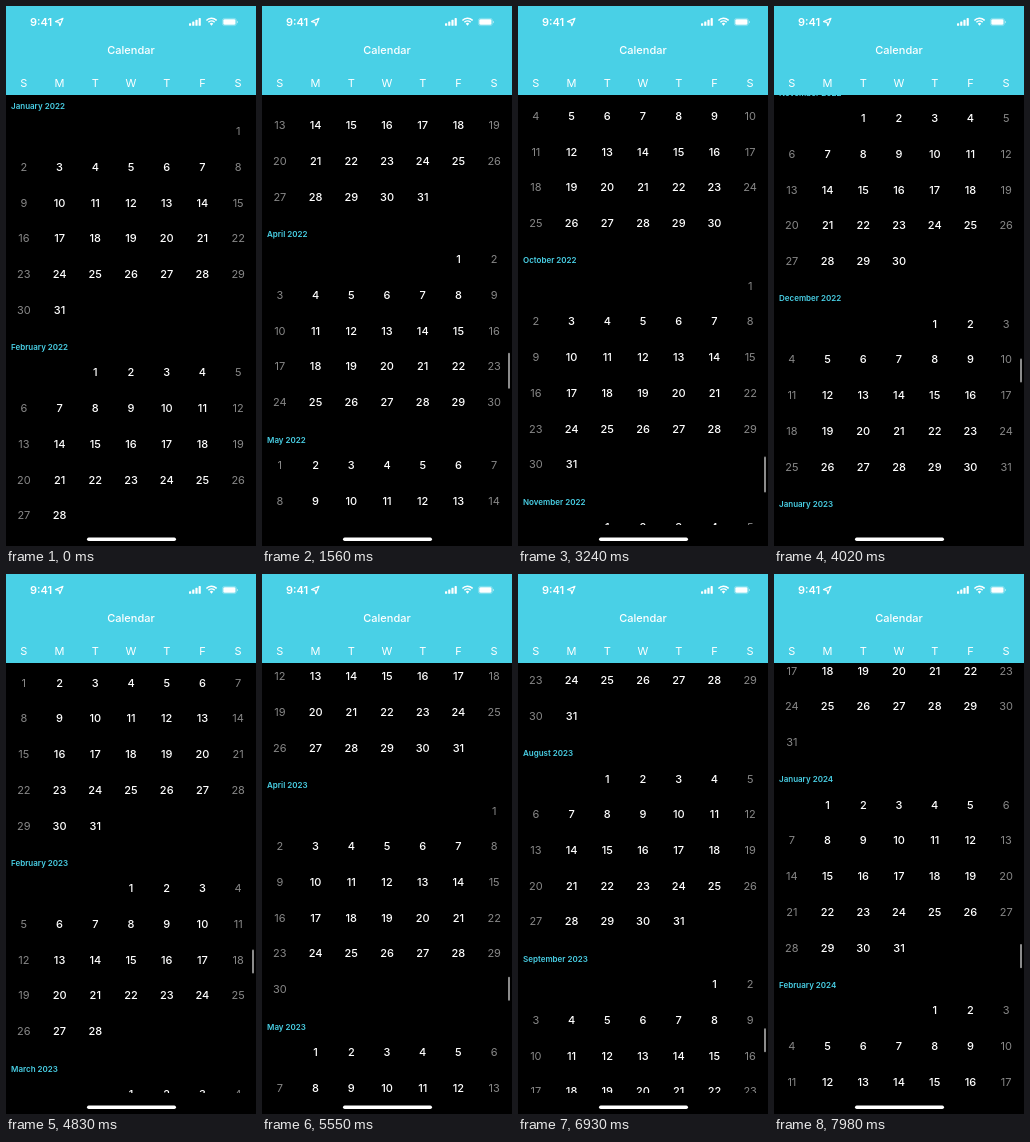
These frames come from a looping animation (250 by 540 pixels, 8000 ms). An HTML page with a canvas:

```html
<!DOCTYPE html>
<html lang="en">
<head>
<meta charset="utf-8">
<title>Calendar</title>
<style>
html, body { margin: 0; width: 100%; height: 100%; overflow: hidden; background: #000; }
canvas { display: block; width: 250px; height: 540px; }
</style>
</head>
<body>
<canvas id="stage"></canvas>
<script>
const W = 250, H = 540, LOOP = 8000, STEP = 30;
const TOP = 89, BOTTOM = 519, VIEW = BOTTOM - TOP;
const CELL = W / 7, TITLE_H = 27;
const CYAN = '#49d0e6', GRAY = '#878787';
const FONT = 'px Inter, Roboto, sans-serif';

const canvas = document.getElementById('stage');
const ctx = canvas.getContext('2d');
const dpr = window.devicePixelRatio || 1;
canvas.width = W * dpr;
canvas.height = H * dpr;
ctx.scale(dpr, dpr);

// Scroll offset over time: [ms, px]
const path = [[720, 0], [1560, 524.4], [3240, 1767], [4830, 2590.5],
              [5550, 3079.3], [6930, 4005], [7980, 5042.5]];
const slope = i => (path[i + 1][1] - path[i][1]) / (path[i + 1][0] - path[i][0]);
const tangents = path.map((p, i) => {
  if (i === 0) return 0.15;
  if (i === path.length - 1) return slope(i - 1);
  const a = slope(i - 1), b = slope(i);
  return 2 * a * b / (a + b);
});

function scrollAt(t) {
  if (t <= path[0][0]) return 0;
  let i = 0;
  while (i < path.length - 2 && t > path[i + 1][0]) i++;
  const [t0, y0] = path[i], [t1, y1] = path[i + 1];
  const d = t1 - t0, u = Math.min(1, (t - t0) / d), v = 1 - u;
  return y0 * v * v * (1 + 2 * u) + y1 * u * u * (3 - 2 * u)
    + d * u * v * (tangents[i] * v - tangents[i + 1] * u);
}

// Months of 2021 to 2024, with January 2022 at offset zero
const months = [];
const yearTop = {};
let offset = 0;
for (let m = 0; m < 48; m++) {
  const date = new Date(2021, m, 1);
  const start = date.getDay();
  const days = new Date(2021, m + 1, 0).getDate();
  const title = date.toLocaleString('en-US', { month: 'long' }) + ' ' + date.getFullYear();
  if (m % 12 === 0) yearTop[date.getFullYear()] = offset;
  const height = TITLE_H + Math.ceil((start + days) / 7) * CELL;
  months.push({ title, start, days, top: offset, height });
  offset += height;
}
yearTop[2025] = offset;
const origin = yearTop[2022];
months.forEach(m => m.top -= origin);
for (const y in yearTop) yearTop[y] -= origin;

function text(s, x, y, size, weight, color, align = 'center') {
  ctx.font = weight + ' ' + size + FONT;
  ctx.fillStyle = color;
  ctx.textAlign = align;
  ctx.fillText(s, x, y + size * 0.364);
}

function pill(x, y, w, h, r, color) {
  ctx.fillStyle = color;
  ctx.beginPath();
  ctx.roundRect(x, y, w, h, r);
  ctx.fill();
}

function drawMonth(m, y) {
  text(m.title, 5, y, 8, 600, CYAN, 'left');
  for (let d = 1; d <= m.days; d++) {
    const slot = m.start + d - 1, col = slot % 7, row = Math.floor(slot / 7);
    const weekend = col === 0 || col === 6;
    text(d, (col + 0.5) * CELL, y + 25.2 + row * CELL, 11,
      weekend ? 400 : 500, weekend ? GRAY : '#fff');
  }
}

function drawIndicator(t, scroll) {
  // Three years at most are loaded; the next one joins when the last month shows.
  const last = scroll > 4477 ? 2024 : scroll > 1940 ? 2023 : 2022;
  const first = Math.max(2021, last - 2);
  const total = yearTop[last + 1] - yearTop[first];
  const alpha = 0.55 * Math.max(0, Math.min(1, (t - 720) / 150));
  const y = TOP + (scroll - yearTop[first]) / total * VIEW;
  pill(246, y - 1, 2, VIEW * VIEW / total, 1, `rgba(255,255,255,${alpha})`);
}

function drawHeader() {
  ctx.fillStyle = CYAN;
  ctx.fillRect(0, 0, W, TOP);
  text('Calendar', 125, 44, 11, 500, '#fff');
  [...'SMTWTFS'].forEach((s, i) => text(s, (i + 0.5) * CELL, 77, 11, 400, '#fff'));
  text('9:41', 24, 16, 11, 600, '#fff', 'left');

  ctx.strokeStyle = '#fff';
  ctx.lineWidth = 1.1;
  ctx.lineJoin = 'round';
  ctx.stroke(new Path2D('M57 12.3L49.5 15.6L53 16.4L53.8 19.8Z'));

  for (let i = 0; i < 4; i++) {
    const h = 2.6 + i * 1.7;
    pill(183 + i * 3.2, 19.8 - h, 2.2, h, 0.6, '#fff');
  }

  ctx.lineWidth = 1.5;
  for (const r of [4.3, 7]) {
    ctx.beginPath();
    ctx.arc(205.5, 19.2, r, -Math.PI * 0.76, -Math.PI * 0.24);
    ctx.stroke();
  }
  ctx.fillStyle = '#fff';
  ctx.beginPath();
  ctx.moveTo(205.5, 19.8);
  ctx.arc(205.5, 19.2, 2.3, -Math.PI * 0.76, -Math.PI * 0.24);
  ctx.fill();

  ctx.lineWidth = 0.6;
  ctx.strokeStyle = 'rgba(255,255,255,.5)';
  ctx.beginPath();
  ctx.roundRect(216.4, 12.4, 14, 7.2, 2.2);
  ctx.stroke();
  pill(217.3, 13.2, 12.2, 5.6, 1.4, '#fff');
  pill(231, 14.8, 0.8, 2.4, 0.4, 'rgba(255,255,255,.6)');
}

function draw(t) {
  const scroll = scrollAt(t);
  ctx.fillStyle = '#000';
  ctx.fillRect(0, 0, W, H);

  ctx.save();
  ctx.beginPath();
  ctx.rect(0, TOP, W, VIEW);
  ctx.clip();
  for (const m of months) {
    const y = 100 + m.top - scroll;
    if (y < BOTTOM + 10 && y + m.height > TOP - 10) drawMonth(m, y);
  }
  drawIndicator(t, scroll);
  ctx.restore();

  drawHeader();
  pill(81, 531.5, 89, 3.4, 1.7, '#fff');
}

const begin = performance.now();
function tick() {
  const t = (performance.now() - begin) % LOOP;
  draw(Math.floor(t / STEP) * STEP);
  requestAnimationFrame(tick);
}
tick();
</script>
</body>
</html>
```
